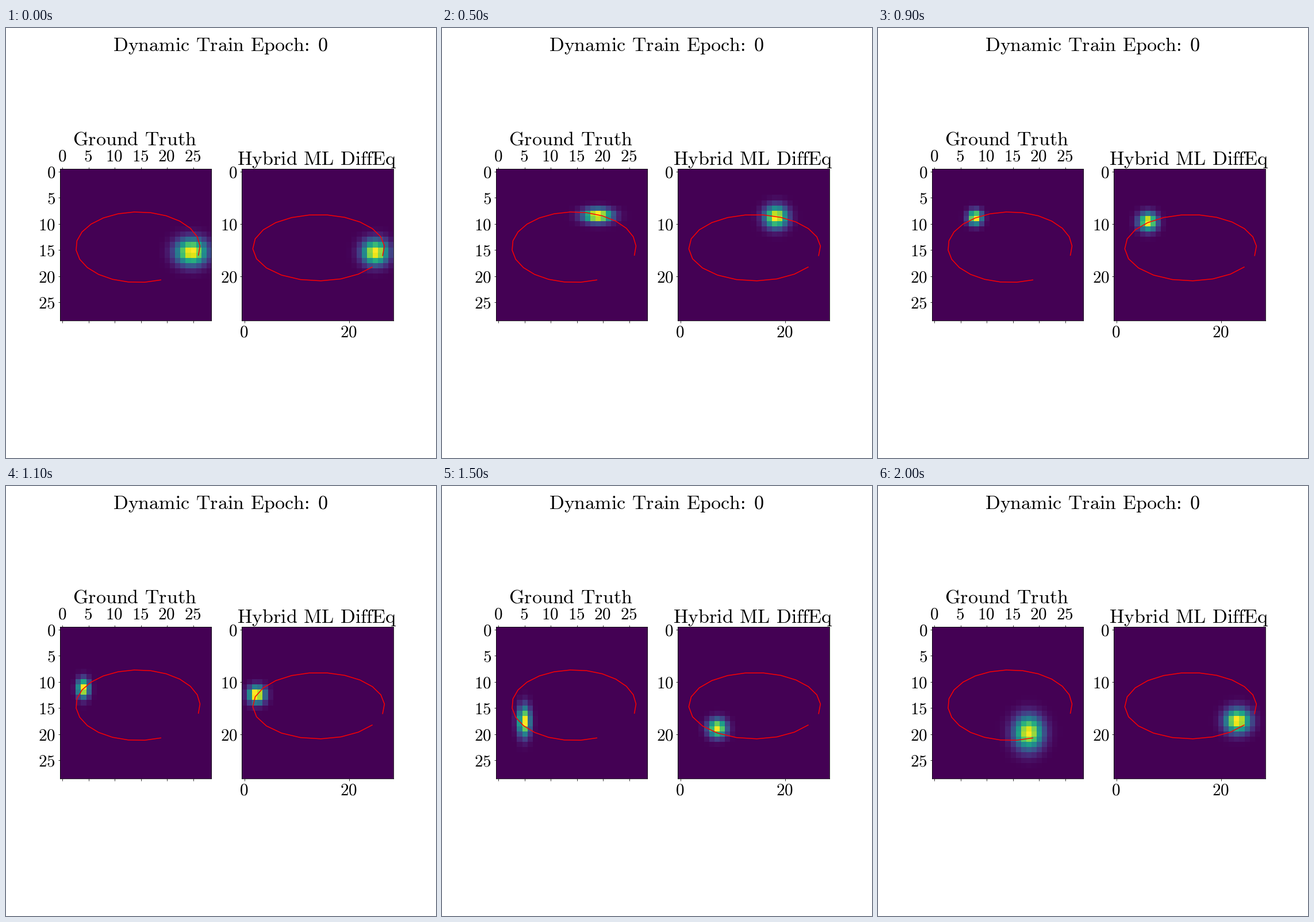
A matplotlib script for the animation above (2.1 s loop, 748x748 px).

```python
import matplotlib.pyplot as plt
import numpy as np
from matplotlib.animation import FuncAnimation

STAGE, DPI, N, FRAMES = 748, 68, 29, 21
PX = 72 / DPI         # points per pixel
LAYOUT = 748.8        # nominal layout width, slightly over the stage
SIDE = LAYOUT * 0.775 / 2.2
CELL = SIDE / N
TOP = STAGE - LAYOUT * 0.495 - SIDE / 2

plt.rcParams.update({
    "mathtext.fontset": "cm",
    "axes.linewidth": 0.8 * PX,
    "lines.linewidth": 1.5 * PX,
})
for axis in ("xtick", "ytick"):
    plt.rcParams[f"{axis}.major.size"] = 3.5 * PX
    plt.rcParams[f"{axis}.major.width"] = 0.8 * PX

CELLS = np.arange(N)
STEPS = np.arange(FRAMES)


def true_path(step):
    phase = 0.266 * (step - 0.87)
    return 14.45 + 11.87 * np.cos(phase), 14.43 - 6.74 * np.sin(phase)


def true_spread(x, y):
    return 1.35 + 0.65 * np.tanh((x - 13) / 6), 0.05 + 0.1 * y


def model_path(step):
    lag = 0.14 * np.sin(np.pi * step / 20) ** 2
    phase = 0.295 * step - 0.24 - lag
    return 14.2 + 12.6 * np.cos(phase), 14.54 - 6.33 * np.sin(phase)


def model_spread(x, y):
    return 1.02 + 0.024 * x, 1.02 + 0.02 * x


def blob(path, spread, step):
    """Gaussian spot near the path vertex, scaled to a peak of 1."""
    x, y = path(step)
    sx, sy = spread(x, y)
    gx = np.exp(-0.5 * ((CELLS - 0.93 * x - 0.44) / sx) ** 2)
    gy = np.exp(-0.5 * ((CELLS - 0.92 * y - 0.67) / sy) ** 2)
    spot = np.outer(gy, gx)
    return spot / spot.max()


fig, (left, right) = plt.subplots(
    1, 2, figsize=(STAGE / DPI, STAGE / DPI), dpi=DPI, facecolor="white")
k = LAYOUT / STAGE
fig.subplots_adjust(left=0.125 * k, right=0.9 * k,
                    bottom=0.11 * k, top=0.88 * k, wspace=0.2)


def write(x, y, text, size, ha="center"):
    """Roman text with its baseline at pixel (x, y) from the top left."""
    body = text.replace(": ", r"\hspace{-.2}:\hspace{.306}")
    body = body.replace("ff", r"f\hspace{-.03}f").replace(" ", r"\hspace{.38}")
    fig.text(x / STAGE, 1 - y / STAGE, rf"$\mathrm{{{body}}}$",
             fontsize=size * PX, ha=ha, va="baseline", color="black")


def panel(ax, path, spread, x0, xticks, yticks, x_baseline):
    """Heat map with its path and tick labels; returns the image."""
    image = ax.imshow(blob(path, spread, 0), cmap="viridis", vmin=0, vmax=1,
                      interpolation="nearest")
    ax.autoscale(False)
    ax.plot(*path(STEPS), color="red")
    ax.set_xticks(xticks)
    ax.set_yticks(yticks)
    ax.tick_params(labelbottom=False, labelleft=False)
    for v in xticks:
        write(x0 + (v + 0.5) * CELL - 0.7, x_baseline, str(v), 29)
    for v in yticks:
        write(x0 - 7.5, TOP + (v + 0.5) * CELL + 10.2, str(v), 29, "right")
    return image


fives, tens, twenties = range(0, N, 5), range(0, N, 10), range(0, N, 20)
x_left = 0.125 * LAYOUT
x_right = x_left + 1.2 * SIDE
true_img = panel(left, true_path, true_spread, x_left, fives, fives, 231.7)
model_img = panel(right, model_path, model_spread, x_right,
                  twenties, tens, 537.7)
left.tick_params(top=True)

write(373, 39.5, "Dynamic Train Epoch: 0", 34.1)
write(223.7, 203.5, "Ground Truth", 34.1)
write(540.5, 238, "Hybrid ML DiffEq", 34.1)


def update(step):
    true_img.set_data(blob(true_path, true_spread, step))
    model_img.set_data(blob(model_path, model_spread, step))
    return true_img, model_img


anim = FuncAnimation(fig, update, frames=FRAMES, interval=100,
                     repeat=True, repeat_delay=0, blit=False)
plt.show()
```
